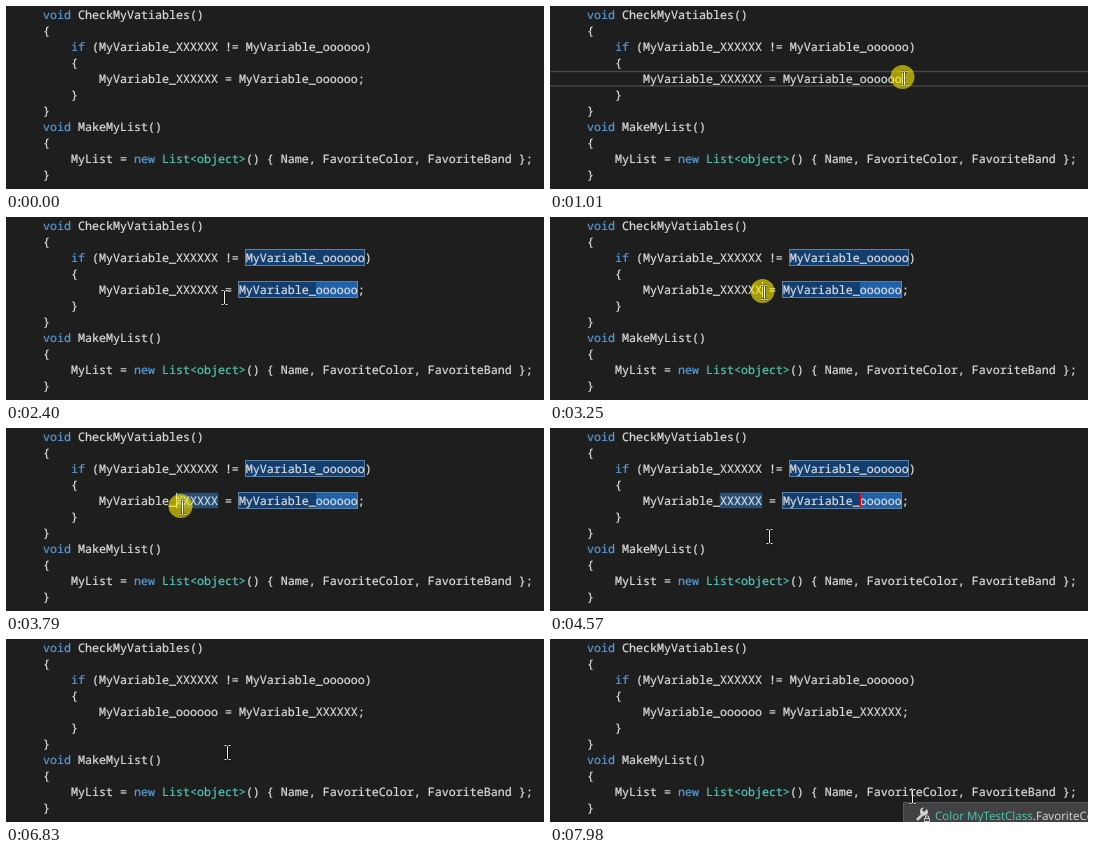
Write an HTML page that moves like this. It is 538 px wide and 183 px high and loops after 8000 ms.

```html
<!DOCTYPE html>
<html lang="en">
<head>
<meta charset="utf-8">
<title>Code editor: swapping two selections</title>
<style>
  html, body { margin: 0; width: 100%; height: 100%; overflow: hidden; background: #1e1e1e; }
  svg { display: block; }
  text { white-space: pre; color: #dcdcdc; fill: currentColor; text-rendering: geometricPrecision; }
  tspan { fill: currentColor; }
  #code text { font: 11.667px "Noto Sans Mono", monospace; }
  #code text, #code tspan { stroke: currentColor; stroke-width: .22; }
  #tip text { font: 11.6px "Open Sans", sans-serif; }
  .k { color: #569cd6; }
  .t { color: #4ec9b0; }
  .ref { fill: #123e70; stroke: #5c7fa6; }
  .sel { fill: #39f; opacity: .4; }
  #selB { stroke: #39f; stroke-opacity: .5; }
</style>
</head>
<body>
<svg width="538" height="183" viewBox="0 0 538 183">
  <path id="line" d="M0 65.5H538M0 80H538" stroke="#464646" stroke-width="1.6"/>
  <g id="refs">
    <rect class="ref" x="239.5" y="32.5" width="119" height="16"/>
    <rect class="ref" x="232.5" y="64.5" width="119" height="16"/>
  </g>
  <rect class="sel" id="selA" y="65" height="15"/>
  <rect class="sel" id="selB" y="65" height="15"/>
  <g id="code"></g>
  <rect id="caretA" y="65" width="1" height="15"/>
  <rect id="caretB" y="65" width="1" height="15"/>
  <g id="tip">
    <rect x="2" y="2" width="280" height="31" fill="#000" opacity=".25"/>
    <rect x=".5" y=".5" width="277" height="27" fill="#424245" stroke="#55555a"/>
    <g id="wrench" fill="none" stroke="#d0d0d0">
      <path d="M14 18l6-6" stroke-width="2.6"/>
      <path d="M24 7l-3 3-2-2 2-2.500a4 4 0 1 0 4 4z" fill="#d0d0d0" stroke="none"/>
      <path d="M21.500 16.500h5v3h-5zM22.500 16v-2h3v2"/>
    </g>
    <path id="box" d="M14 10l6-3 6 3v6l-6 3-6-3zM14 10l6 3 6-3M20 13v6" fill="none" stroke="#5aa7e0"/>
    <text id="tipText" x="32" y="18"></text>
  </g>
  <circle id="click" r="12" fill="#fff000" opacity=".6"/>
  <g id="mouse" fill="none">
    <path id="beam" d="M-3 -7H-1M1 -7H3M0 -6.500V6.500M-3 7H-1M1 7H3" stroke="#000" stroke-width="2" opacity=".4"/>
    <use href="#beam"/>
    <path d="M-3 -7H-1M1 -7H3M0 -6.500V6.500M-3 7H-1M1 7H3" stroke="#f4f4f4"/>
  </g>
</svg>
<script>
const LOOP = 8000, CHAR = 7, LEFT = 93;
const $ = id => document.getElementById(id);
const span = (cls, s) => `<tspan class="${cls}">${s}</tspan>`;
const assign = (a, b) => `MyVariable_${a} = MyVariable_${b};`;

// Indent level and markup of each row
const rows = [
  [0, span('k', 'void') + ' CheckMyVatiables()'],
  [0, '{'],
  [1, span('k', 'if') + ' (MyVariable_XXXXXX != MyVariable_oooooo)'],
  [1, '{'],
  [2, assign('XXXXXX', 'oooooo')],
  [1, '}'],
  [0, '}'],
  [0, span('k', 'void') + ' MakeMyList()'],
  [0, '{'],
  [1, `MyList = ${span('k', 'new')} ${span('t', 'List&lt;object&gt;')}() { Name, FavoriteColor, FavoriteBand };`],
  [0, '}']
];
$('code').innerHTML = rows.map(([indent, s], i) =>
  `<text x="${37 + 28 * indent}" y="${13 + 16 * i}">${s}</text>`).join('');
const swapRow = $('code').children[4];

// Mouse path: time, x, y
const path = [
  [70, 395, 162], [300, 352, 104], [460, 338, 74], [610, 354, 74], [930, 354, 72],
  [1080, 354, 72], [1620, 309, 71], [1770, 306, 72], [2340, 218, 80], [2900, 218, 80],
  [3020, 215, 75], [3240, 214, 75], [3320, 214, 75], [3790, 174, 79], [3950, 174, 79],
  [4030, 162, 80], [4250, 162, 80], [4500, 219, 108], [4570, 219, 108], [4650, 221, 113],
  [7150, 221, 113], [7740, 355, 161], [7890, 362, 157]
];

function mouseAt(t) {
  const i = path.findIndex(p => p[0] > t);
  if (i < 0) return path[path.length - 1].slice(1);
  if (i === 0) return path[0].slice(1);
  const [t0, x0, y0] = path[i - 1], [t1, x1, y1] = path[i];
  const u = (t - t0) / (t1 - t0);
  return [Math.round(x0 + (x1 - x0) * u), Math.round(y0 + (y1 - y0) * u)];
}

const show = (id, on) => $(id).setAttribute('display', on ? 'inline' : 'none');
const move = (id, x, y) => $(id).setAttribute('transform', `translate(${x} ${y})`);

function caret(id, on, x, color) {
  show(id, on);
  $(id).setAttribute('x', x);
  $(id).setAttribute('fill', color);
}

// Start of a selection dragged leftwards, snapped to the character grid
function dragStart(t, from, until, end, mouseX) {
  if (t < from) return end;
  const first = end - 6 * CHAR;
  if (t >= until) return first;
  const x = LEFT + CHAR * Math.round((mouseX - LEFT) / CHAR);
  return Math.min(end, Math.max(first, x));
}

function select(id, start, end, on) {
  show(id, on && start < end);
  $(id).setAttribute('x', start);
  $(id).setAttribute('width', end - start);
}

const field = name => `(field) ${span('k', 'string')} ${span('t', 'MyTestClass')}.MyVariable_${name}`;
const property = `${span('t', 'Color')} ${span('t', 'MyTestClass')}.FavoriteColor { get; set; }`;
// Tooltips: start, end, x, y, icon, markup
const tips = [
  [760, 930, 354, 82, 'box', field('oooooo')],
  [2550, 3250, 214, 82, 'box', field('XXXXXX')],
  [7970, LOOP, 353, 163, 'wrench', property]
];
let shownTip;

function drawTip(t) {
  const tip = tips.find(([from, to]) => t >= from && t < to);
  show('tip', tip);
  if (!tip || tip === shownTip) return;
  shownTip = tip;
  const [, , x, y, icon, markup] = tip;
  move('tip', x, y);
  show('wrench', icon === 'wrench');
  show('box', icon === 'box');
  $('tipText').innerHTML = markup;
}

let swapped;

function draw(t) {
  const isIn = (from, to) => t >= from && t < to;
  const tick = Math.floor((t + 8) / 76.9) * 76.9;
  const [x, y] = mouseAt(tick);
  show('mouse', t >= 70);
  move('mouse', x + .5, y + .5);
  show('click', isIn(930, 1700) || isIn(3250, 3960));
  move('click', x - 1.5, y - 1);

  const done = t >= 6280;
  if (done !== swapped) {
    swapped = done;
    swapRow.textContent = done ? assign('oooooo', 'XXXXXX') : assign('XXXXXX', 'oooooo');
  }
  const startA = dragStart(t, 1080, 1620, 352, x);
  const startB = dragStart(t, 3250, 3790, 212, x);
  select('selA', startA, 352, !done);
  select('selB', startB, 212, !done);
  show('line', t >= 930 && startA === 352);
  show('refs', isIn(2000, 6280));

  if (done) {
    const blink = isIn(6280, 6830) || isIn(7360, 7900);
    caret('caretA', blink, 352, '#f00');
    caret('caretB', blink, 212, '#dcdcdc');
  } else {
    const second = t >= 3250;
    const blinkA = second ? isIn(4260, 4810) || isIn(5270, 5820) : isIn(930, 2150) || isIn(2700, 3250);
    const blinkB = isIn(3250, 4260) || isIn(4810, 5270) || t >= 5820;
    caret('caretA', blinkA, startA, second ? '#f00' : '#dcdcdc');
    caret('caretB', blinkB, startB, '#dcdcdc');
  }
  drawTip(t);
}

const begin = performance.now();
function frame() {
  draw((performance.now() - begin) % LOOP);
  requestAnimationFrame(frame);
}
frame();
</script>
</body>
</html>
```
